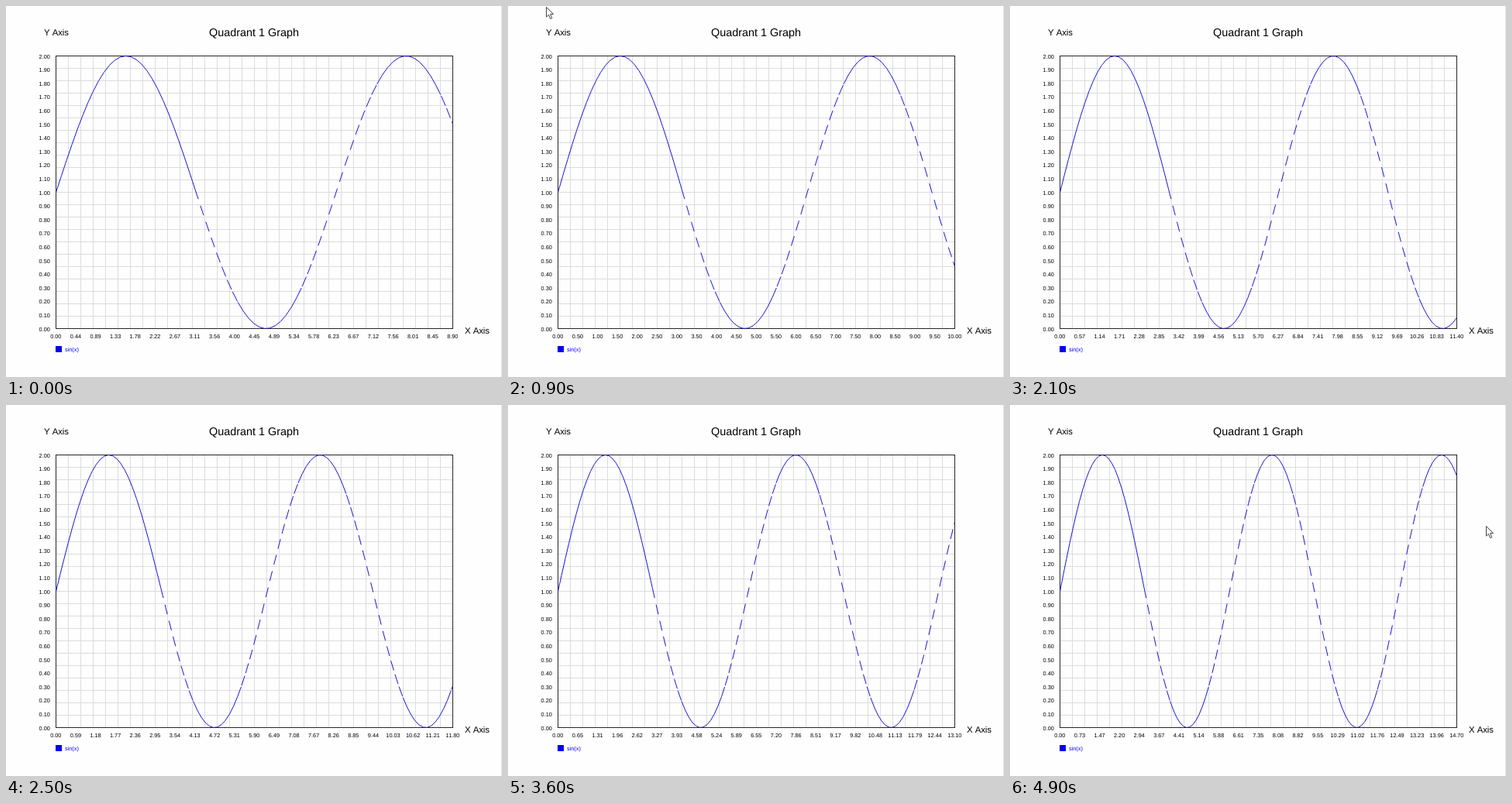
Animation, 640 px wide and 479 px high, one loop 5 s. Source, as an HTML page:

```html
<!DOCTYPE html>
<html lang="en">
<head>
<meta charset="utf-8">
<title>Sine graph</title>
<style>
  html, body { margin: 0; width: 100%; height: 100%; overflow: hidden; background: #fefefe; }
  svg { display: block; width: 640px; height: 479px; }
  text {
    font-family: "Liberation Sans", Arial, sans-serif;
    font-kerning: none;
    text-rendering: geometricPrecision;
    fill: #000;
  }
  .tick { font-size: 7.3px; }
  .axis { font-size: 11.3px; }
  .crisp { shape-rendering: crispEdges; fill: none; stroke-width: 1; }
</style>
</head>
<body>
<svg id="stage" viewBox="0 0 640 479"></svg>
<script>
const LEFT = 64, RIGHT = 576, TOP = 64, BOTTOM = 416, TICKS = 20, CELL = 16;
const WIDTH = RIGHT - LEFT, HEIGHT = BOTTOM - TOP;
const LOOP = 5000, STEP = 100;
const SEGMENT = 0.12; // x distance from one dash to the next
const DASH = 12.5;    // greatest height of a dash

const stage = document.getElementById("stage");

function add(tag, attrs, text) {
  const el = document.createElementNS("http://www.w3.org/2000/svg", tag);
  for (const key in attrs) el.setAttribute(key, attrs[key]);
  if (text) el.textContent = text;
  return stage.appendChild(el);
}

// Static parts
add("rect", { x: 0, y: 0, width: 640, height: 479, fill: "#fefefe" });
add("path", { d: "M639.5 0V479", stroke: "#e2e2e4", class: "crisp" });

let grid = "";
for (let x = LEFT + CELL; x < RIGHT; x += CELL) grid += `M${x + 0.5} ${TOP}V${BOTTOM}`;
for (let y = TOP + CELL; y < BOTTOM; y += CELL) grid += `M${LEFT} ${y + 0.5}H${RIGHT}`;
add("path", { d: grid, stroke: "#dcdcde", class: "crisp" });
add("rect", { x: LEFT + 0.5, y: TOP + 0.5, width: WIDTH, height: HEIGHT, stroke: "#262626", class: "crisp" });

add("text", { x: 320, y: 39.3, "font-size": 14.4, "text-anchor": "middle" }, "Quadrant 1 Graph");
add("text", { x: 49, y: 38.4, class: "axis" }, "Y Axis");
add("text", { x: 592, y: 422.5, class: "axis" }, "X Axis");
add("rect", { x: 64, y: 439, width: 8, height: 8, fill: "#0000f0" });
add("text", { x: 76, y: 445.5, class: "tick", style: "fill:#0000f0" }, "sin(x)");

const xLabels = [];
for (let i = 0; i <= TICKS; i++) {
  add("text", { x: 56.8, y: 67.5 + i * HEIGHT / TICKS, class: "tick", "text-anchor": "end" },
    (2 - i / 10).toFixed(2));
  xLabels.push(add("text", { x: LEFT + 0.3 + i * WIDTH / TICKS, y: 429, class: "tick", "text-anchor": "middle" }));
}

const curve = add("path", { stroke: "#1a14cc", "stroke-width": 1, fill: "none" });
const cursor = add("path", {
  d: "M.5 .5V13.2L3.5 10.4L5.7 15.6L7.8 14.7L5.6 9.6H9.6Z",
  fill: "#fff", stroke: "#444", "stroke-width": 1
});

// Pointer paths: [step, x, y], hidden outside each path
const PATHS = [
  [[3, 62, 430], [5, 60, 130], [6, 56, 12], [7, 49, 1], [12, 49, 1], [13, 53, 1], [16, 545, 1]],
  [[28, 630, 200], [33, 631, 195]],
  [[40, 630, 170], [41, 615, 158], [42, 613, 157], [49, 614, 156]]
];

function pointerAt(n) {
  for (const path of PATHS) {
    for (let i = 1; i < path.length; i++) {
      const [n0, x0, y0] = path[i - 1], [n1, x1, y1] = path[i];
      if (n < n0 || n > n1) continue;
      const k = (n - n0) / (n1 - n0);
      return [Math.round(x0 + (x1 - x0) * k), Math.round(y0 + (y1 - y0) * k)];
    }
  }
  return null;
}

// Right end of the x axis, in tenths
function rangeAt(n) {
  const held = n === 38 ? 37 : n;
  return 89 + Math.floor(1.172 * held + 0.65);
}

// Whole up to half a wave, then every steep segment is cut to a dash
function curvePath(range) {
  const px = x => LEFT + 0.5 + WIDTH * x / range;
  const py = x => BOTTOM + 0.5 - HEIGHT / 2 * (1 + Math.sin(x));
  let d = `M${px(0)} ${py(0)}`;
  for (let a = 0; a < range; a += SEGMENT) {
    const b = Math.min(a + SEGMENT, range);
    const x = px(a), y = py(a), dx = px(b) - x, dy = py(b) - y;
    const part = b < Math.PI ? 1 : Math.min(1, DASH / Math.abs(dy));
    d += `L${x.toFixed(2)} ${y.toFixed(2)}l${(dx * part).toFixed(2)} ${(dy * part).toFixed(2)}`;
    if (part < 1) d += `M${px(b).toFixed(2)} ${py(b).toFixed(2)}`;
  }
  return d;
}

let shown = -1;

function draw(time) {
  const n = Math.floor(time % LOOP / STEP);
  if (n === shown) return;
  shown = n;
  const tenths = rangeAt(n);
  xLabels.forEach((label, i) => {
    label.textContent = (Math.floor(tenths * i / 2) / 100).toFixed(2);
  });
  curve.setAttribute("d", curvePath(tenths / 10));
  const spot = pointerAt(n);
  cursor.setAttribute("visibility", spot ? "visible" : "hidden");
  if (spot) cursor.setAttribute("transform", `translate(${spot})`);
}

let start = null;
function tick(now) {
  if (start === null) start = now;
  draw(Math.max(0, now - start));
  requestAnimationFrame(tick);
}
draw(0);
requestAnimationFrame(tick);
</script>
</body>
</html>
```
